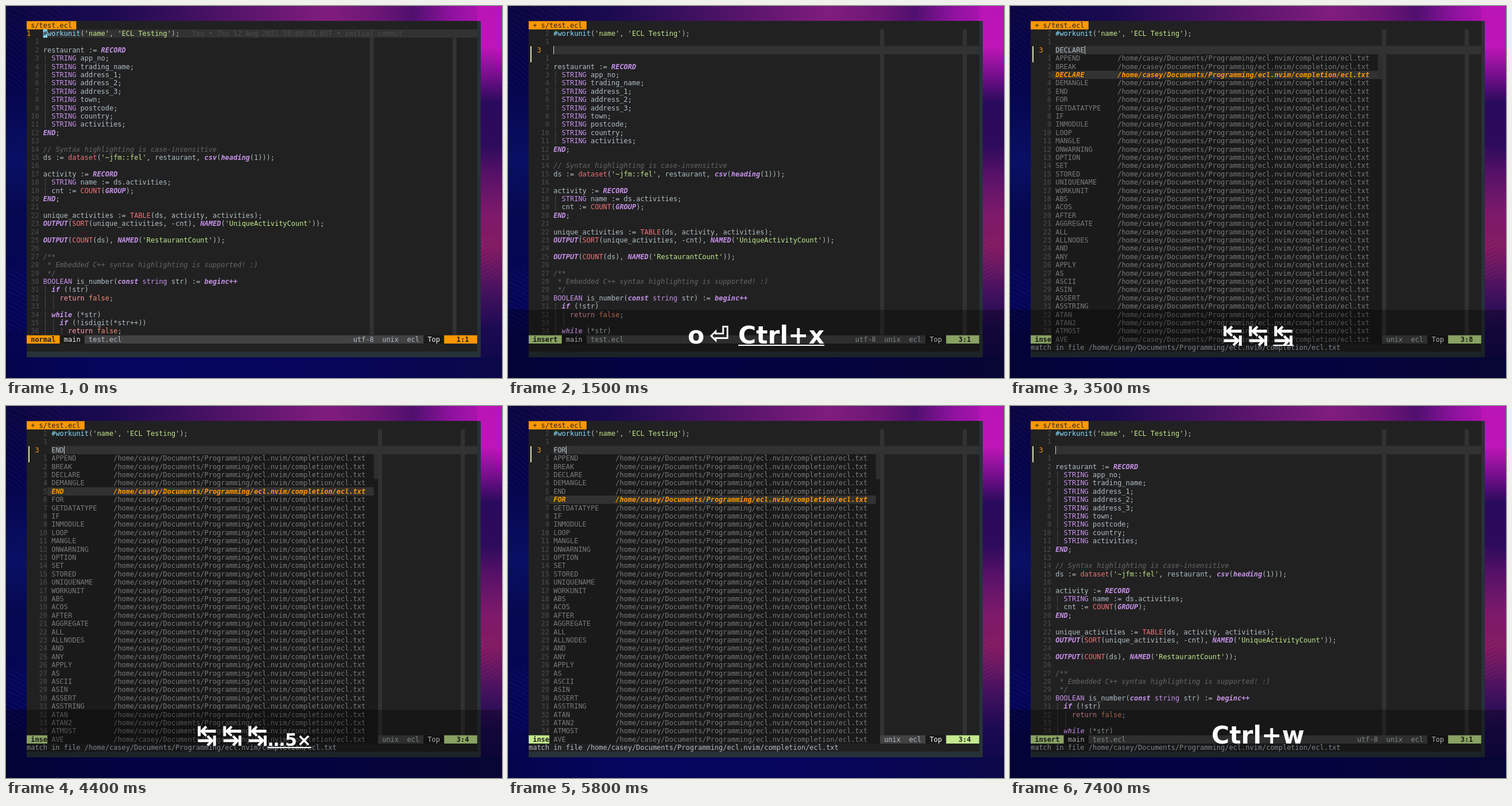
An HTML page with a canvas that plays this animation: 864x648 px, repeating every 8000 ms.

```html
<!DOCTYPE html>
<html lang="en">
<head>
<meta charset="utf-8">
<title>Editor completion</title>
<style>
html, body { margin: 0; width: 100%; height: 100%; overflow: hidden; background: #04043c; }
canvas { display: block; }
</style>
</head>
<body>
<canvas id="stage" width="864" height="648"></canvas>
<script>
const W = 864, H = 648, LOOP = 8000;
const CW = 7.2, CH = 14.4, X0 = 36, Y0 = 26.4, COLS = 109;
const MONO = '11.96px "DejaVu Sans Mono", monospace';
const ctx = document.getElementById('stage').getContext('2d');

const C = {
  bg: '#212121', fg: '#b0bec5', line: '#323232', bar: '#424242', dim: '#4c4c4c',
  orange: '#ff9800', green: '#c3e88d', purple: '#c792ea', red: '#f07178',
  cyan: '#89ddff', pink: '#ff9cac', coral: '#f78c6c', comment: '#666666',
  dark: '#1a1a1a', menuText: '#7a7a7a', thumb: '#2e2e2e', edge: '#263238'
};

const CODE = `restaurant := RECORD
  STRING app_no;
  STRING trading_name;
  STRING address_1;
  STRING address_2;
  STRING address_3;
  STRING town;
  STRING postcode;
  STRING country;
  STRING activities;
END;

// Syntax highlighting is case-insensitive
ds := dataset('~jfm::fel', restaurant, csv(heading(1)));

activity := RECORD
  STRING name := ds.activities;
  cnt := COUNT(GROUP);
END;

unique_activities := TABLE(ds, activity, activities);
OUTPUT(SORT(unique_activities, -cnt), NAMED('UniqueActivityCount'));

OUTPUT(COUNT(ds), NAMED('RestaurantCount'));

/**
 * Embedded C++ syntax highlighting is supported! :)
 */
BOOLEAN is_number(const string str) := beginc++
  if (!str)
    return false;
    
  while (*str)
    if (!isdigit(*str++))
      return false;`.split('\n');
const FIRST = "#workunit('name', 'ECL Testing');";

const WORDS = ('APPEND BREAK DECLARE DEMANGLE END FOR GETDATATYPE IF INMODULE LOOP MANGLE ' +
  'ONWARNING OPTION SET STORED UNIQUENAME WORKUNIT ABS ACOS AFTER AGGREGATE ALL ALLNODES ' +
  'AND ANY APPLY AS ASCII ASIN ASSERT ASSTRING ATAN ATAN2 ATMOST AVE').split(' ');
const DICT = '/home/casey/Documents/Programming/ecl.nvim/completion/ecl.txt';

const STYLES = {};
function addStyle(words, color, font = '') {
  for (const w of words.split(' ')) STYLES[w] = [color, font];
}
addStyle('RECORD END csv heading GROUP OUTPUT NAMED const beginc++ if while', C.purple, 'italic bold');
addStyle('STRING BOOLEAN string', C.purple);
addStyle('dataset COUNT TABLE SORT', C.red);
addStyle('return', C.pink);
addStyle('false', C.coral);

// Key caption: plain head, last key, and a small repeat count
const THIN = '\u2009';
const keys = (head, last) => ({ head, last, count: '' });
function tabs(n) {
  const tab = '\u21b9';
  return n > 3
    ? { head: [tab, tab, tab].join(THIN), last: '', count: `\u2026${n}\u00d7` }
    : keys((tab + THIN).repeat(n - 1), tab);
}
const press = n => ({ pick: n, keys: tabs(n), hot: true });
const OPEN = `o${THIN}\u23ce `;

const STEPS = [
  [0, { mode: 'normal', line: 1, signs: false, menu: false, pick: 0, keys: null, hot: false, msg: '' }],
  [700, { mode: 'insert', line: 2, keys: keys('', 'o'), hot: true }],
  [800, { line: 3, keys: keys('o' + THIN, '\u23ce') }],
  [900, { signs: true }],
  [1000, { hot: false }],
  [1500, { keys: keys(OPEN, 'Ctrl+x'), hot: true }],
  [1700, { keys: keys(OPEN + 'Ctrl+x ', 'Ctrl+k'), menu: true, msg: 'scan' }],
  [1900, { hot: false }],
  [2400, { keys: null }],
  [3000, { ...press(1), msg: 'match' }],
  [3500, press(3)],
  [3700, { hot: false }],
  [3900, press(4)],
  [4100, { hot: false }],
  [4400, press(5)],
  [4600, { hot: false }],
  [5100, press(6)],
  [5300, { hot: false }],
  [5800, { keys: null }],
  [7200, { keys: keys('', 'Ctrl+w'), hot: true }],
  [7300, { menu: false, pick: 0 }],
  [7400, { hot: false }]
];

function stateAt(t) {
  return Object.assign({}, ...STEPS.filter(s => s[0] <= t).map(s => s[1]));
}

function cells(col, row, cols, rows, color) {
  ctx.fillStyle = color;
  ctx.fillRect(X0 + col * CW, Y0 + row * CH, cols * CW, rows * CH);
}

function put(text, col, row, color, font = '') {
  ctx.font = `${font} ${MONO}`;
  ctx.fillStyle = color;
  ctx.fillText(text, X0 + col * CW, Y0 + row * CH + 11.2);
}

function codeLine(text, col, row) {
  if (/^ ?[\/*]/.test(text)) return put(text, col, row, C.comment, 'italic');
  const indent = text.match(/^ */)[0].length;
  for (let i = 0; i < indent; i += 2) put('|', col + i, row, C.dim);
  for (const m of text.matchAll(/'[^']*'|#?\w+(?:\+\+$)?|[^\w'#]+/g)) {
    const word = m[0];
    let style = STYLES[word] || [C.fg, ''];
    if (word[0] === "'") style = [C.green, ''];
    if (word[0] === '#') style = [C.cyan, ''];
    if (word.trim()) put(word, col + m.index, row, ...style);
  }
}

function gradient(x0, y0, x1, y1, stops) {
  const g = ctx.createLinearGradient(x0, y0, x1, y1);
  stops.forEach(([p, color]) => g.addColorStop(p, color));
  return g;
}

function waves(x, y, w, h, slope, gap, color) {
  ctx.save();
  ctx.beginPath();
  ctx.rect(x, y, w, h);
  ctx.clip();
  ctx.strokeStyle = color;
  ctx.lineWidth = 1;
  for (let b = y - w; b < y + h + w; b += gap) {
    ctx.beginPath();
    ctx.moveTo(x, b);
    ctx.quadraticCurveTo(x + w / 2, b + slope * w * 0.35, x + w, b + slope * w);
    ctx.stroke();
  }
  ctx.restore();
}

function wallpaper() {
  ctx.fillStyle = gradient(0, 0, W, 0, [
    [0, '#0a0640'], [0.2, '#1a0a50'], [0.36, '#3c105e'], [0.5, '#5e166c'], [0.65, '#801d7c'],
    [0.75, '#6c1676'], [0.82, '#50106e'], [0.9, '#9012a0'], [1, '#c214ba']]);
  ctx.fillRect(0, 0, W, 30);
  ctx.fillStyle = gradient(0, 0, 0, H, [
    [0, '#0a0640'], [0.2, '#05044a'], [0.42, '#091064'], [0.55, '#060850'], [0.8, '#050556'], [1, '#04044c']]);
  ctx.fillRect(0, 0, 36, H);
  ctx.fillStyle = gradient(0, 0, 0, H, [
    [0, '#b914b4'], [0.11, '#be16b6'], [0.18, '#7c1090'], [0.26, '#2a0a5c'], [0.37, '#2c0a5c'],
    [0.46, '#5a1268'], [0.56, '#7e1a6a'], [0.65, '#801a60'], [0.76, '#48125f'], [0.87, '#1a0a52'], [1, '#0c0848']]);
  ctx.fillRect(821, 0, 43, H);
  ctx.fillStyle = gradient(0, 0, W, 0, [[0, '#04044c'], [0.25, '#050560'], [0.65, '#06055a'], [1, '#0c0848']]);
  ctx.fillRect(0, 612, W, 36);
  waves(0, 24, 36, 120, 0.8, 9, 'rgba(70,50,190,.25)');
  waves(0, 0, 110, 26, 0.55, 10, 'rgba(90,50,170,.22)');
  waves(0, 460, 36, 105, 0.5, 8, 'rgba(40,50,220,.28)');
  waves(827, 400, 37, 75, -0.6, 7, 'rgba(190,80,180,.2)');
}

function tabline(s) {
  const label = s.mode === 'insert' ? '+ s/test.ecl' : 's/test.ecl';
  cells(0, 0, label.length + 2, 1, C.orange);
  put(label, 1, 0, C.bg);
}

function buffer(s) {
  const word = s.pick ? WORDS[s.pick - 1] : '';
  const insert = s.mode === 'insert';
  const pad = s.signs ? 2 : 0, col = 4 + pad;
  const lines = [FIRST, ...Array(s.line).fill(''), ...CODE];
  if (insert) lines[s.line - 1] = word;

  cells(col + 79, 1, 1, 37, C.line);
  cells(col + 99, 1, 1, 37, C.line);
  cells(col, s.line, COLS - col, 1, C.line);

  for (let row = 1; row <= 37; row++) {
    if (row === s.line) {
      put(String(row), pad, row, C.orange);
      if (insert) put(word, col, row, C.fg);
      else codeLine(lines[0], col, row);
    } else {
      put(String(Math.abs(row - s.line)).padStart(2), pad + 1, row, C.dim);
      codeLine(lines[row - 1] || '', col, row);
    }
  }
  if (s.signs) {
    ctx.fillStyle = '#d5e3b5';
    ctx.fillRect(39, 70, 2, 28);
  }
  if (insert) {
    ctx.fillStyle = '#d0d0d0';
    ctx.fillRect(Math.round(X0 + (col + word.length) * CW), Y0 + s.line * CH, 1, CH);
  } else {
    put('You \u2022 Thu 12 Aug 2021 18:00:01 BST \u2022 initial commit', 40, 1, C.dim);
    cells(col, 1, 1, 1, C.cyan);
    put('#', col, 1, C.bg);
  }
}

function statusline(s) {
  const accent = s.mode === 'insert' ? C.green : C.orange;
  const typed = s.pick ? WORDS[s.pick - 1].length : 0;
  cells(0, 38, COLS, 1, C.dark);
  cells(0, 38, 8, 1, accent);
  cells(14, 38, 82, 1, C.bar);
  cells(101, 38, 8, 1, accent);
  put(s.mode, 1, 38, C.bg, 'bold');
  put('main', 9, 38, '#eeeeee');
  put('test.ecl', 15, 38, C.fg);
  put('utf-8', 79, 38, C.fg);
  put('unix', 86, 38, C.fg);
  put('ecl', 92, 38, C.fg);
  put('Top', 97, 38, '#ffffff');
  put(`${s.line}:${typed + 1}`, 104, 38, C.bg, 'bold');
  if (s.msg === 'scan') put('Scanning dictionary: ' + DICT, 0, 39, C.green);
  if (s.msg === 'match') put('match in file ' + DICT, 0, 39, C.fg);
}

function menu(s) {
  cells(5, 4, 80, 35, C.dark);
  cells(84, 4, 1, 3, C.thumb);
  WORDS.forEach((word, i) => {
    const on = i === s.pick - 1, row = 4 + i;
    if (on) cells(5, row, 79, 1, C.line);
    const style = on ? [C.orange, 'italic bold'] : [C.menuText, ''];
    put(word, 6, row, ...style);
    put(DICT, 21, row, ...style);
  });
}

function caption({ head, last, count }, hot) {
  ctx.fillStyle = 'rgba(0,0,0,.3)';
  ctx.fillRect(0, 529, W, H - 529);
  const parts = [[head, 42.5, 588], [last, 42.5, 588], [count, 30, 592]].map(([text, size, y]) => {
    const font = `bold ${size}px "DejaVu Sans", sans-serif`;
    ctx.font = font;
    return { text, font, y, w: ctx.measureText(text).width };
  });
  let x = W / 2 - parts.reduce((sum, p) => sum + p.w, 0) / 2;
  ctx.fillStyle = '#ffffff';
  parts.forEach((p, i) => {
    ctx.font = p.font;
    ctx.fillText(p.text, x, p.y);
    if (hot && i && p.text) ctx.fillRect(x, p.y + 2, p.w, 2);
    x += p.w;
  });
}

function draw(s) {
  wallpaper();
  ctx.fillStyle = C.edge;
  ctx.fillRect(36, 26, 791, 586);
  ctx.fillStyle = C.bg;
  ctx.fillRect(36, 26, 785, 576);
  tabline(s);
  buffer(s);
  statusline(s);
  if (s.menu) menu(s);
  if (s.keys) caption(s.keys, s.hot);
}

function frame() {
  draw(stateAt(performance.now() % LOOP));
  requestAnimationFrame(frame);
}
frame();
</script>
</body>
</html>
```
